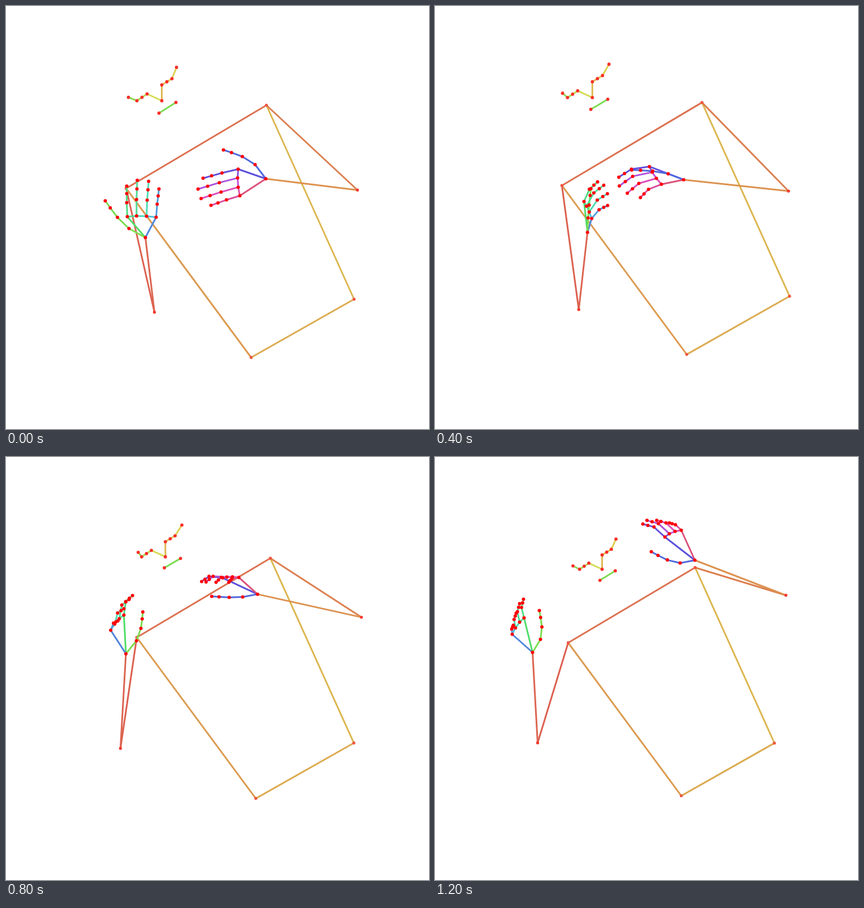
An HTML page with a canvas for the animation above (1.28 s loop, 748 by 748 pixels).

```html
<!DOCTYPE html>
<html lang="en">
<head>
<meta charset="utf-8">
<title>Pose skeleton</title>
<style>
html, body { margin: 0; width: 100%; height: 100%; overflow: hidden; background: #fff; }
canvas { display: block; }
</style>
</head>
<body>
<canvas id="stage" width="748" height="748"></canvas>
<script>
const LOOP = 1280, STEP = 80;
const ctx = document.getElementById('stage').getContext('2d');
const keys = [];
const addKey = (time, pose) => keys.push({ time, ...pose });

// torso: left shoulder and scale; curl: how far the fingers bend
// hands: wrist, then first joint and tip of thumb, index and little finger
addKey(0, {
  torso: [212, 322, 1], nose: [275, 167], elbows: [262, 541, 621, 325], curl: [0.01],
  left: [246, 409, 217, 393, 175, 344, 214, 372, 213, 318, 265, 373, 270, 323],
  right: [459, 305, 440, 280, 384, 254, 410, 288, 348, 304, 413, 335, 362, 352]
});
addKey(160, {
  torso: [215, 318, 1.01], nose: [278, 161], elbows: [267, 538, 619, 333], curl: [0.01],
  left: [274, 404, 249, 385, 217, 333, 255, 365, 265, 314, 303, 372, 317, 326],
  right: [449, 321, 430, 296, 373, 268, 398, 306, 336, 320, 402, 353, 351, 368]
});
addKey(320, {
  torso: [218, 317, 1.014], nose: [277, 159], elbows: [265, 538, 621, 335], curl: [0.03],
  left: [282, 406, 268, 380, 262, 321, 274, 360, 299, 313, 315, 384, 342, 346],
  right: [438, 321, 414, 300, 349, 283, 381, 303, 319, 321, 393, 350, 346, 370]
});
addKey(480, {
  torso: [230, 317, 0.98], nose: [279, 165], elbows: [240, 533, 628, 316], curl: [0.18],
  left: [251, 390, 266, 366, 278, 322, 245, 328, 265, 304, 231, 361, 257, 352],
  right: [442, 289, 412, 289, 350, 291, 379, 261, 334, 279, 409, 275, 382, 300]
});
addKey(640, {
  torso: [235, 317, 0.953], nose: [282, 172], elbows: [218, 520, 629, 299], curl: [0.2],
  left: [217, 365, 234, 342, 239, 295, 208, 302, 219, 273, 185, 331, 198, 319],
  right: [444, 262, 416, 267, 361, 268, 385, 235, 348, 246, 417, 236, 398, 251]
});
addKey(960, {
  torso: [227, 321, 0.95], nose: [282, 181], elbows: [189, 511, 626, 267], curl: [0.15],
  left: [207, 336, 226, 313, 242, 259, 207, 264, 225, 226, 185, 290, 198, 270],
  right: [446, 222, 421, 226, 366, 221, 383, 190, 344, 190, 408, 188, 390, 190]
});
addKey(1200, {
  torso: [235, 328, 0.905], nose: [295, 198], elbows: [181, 505, 620, 244], curl: [0.12],
  left: [172, 345, 186, 322, 184, 271, 157, 284, 156, 251, 136, 313, 138, 297],
  right: [459, 182, 433, 187, 382, 167, 406, 141, 367, 118, 435, 129, 414, 116]
});

const FACE_HUES = [95, 85, 77, 63, 45, 48, 51, 55];
// hues: thumb to little finger, knuckle links, wrist to index, wrist to little finger
const LEFT = { side: -1, fingers: [102, 142, 150, 162, 208], links: [150, 165, 192], index: 130, little: 217 };
const RIGHT = { side: 1, fingers: [230, 248, 280, 314, 326], links: [262, 290, 320], index: 245, little: 342 };

const move = (p, v, k = 1) => [p[0] + v[0] * k, p[1] + v[1] * k];
const span = (p, q) => [q[0] - p[0], q[1] - p[1]];
const mix = (p, q, k) => move(p, span(p, q), k);
const pairs = list => Array.from({ length: list.length / 2 }, (_, i) => list.slice(2 * i, 2 * i + 2));

// Smooth curve through the keys, tangents from the neighbours.
function sample(part, time) {
  let i = keys.findIndex(k => k.time > time) - 1;
  if (i < 0) i = keys.length - 2;
  const a = keys[i], b = keys[i + 1];
  const before = keys[Math.max(i - 1, 0)], after = keys[Math.min(i + 2, keys.length - 1)];
  const gap = b.time - a.time;
  const u = Math.min((time - a.time) / gap, 1), v = 1 - u;
  return a[part].map((p, n) => {
    const q = b[part][n];
    const m0 = (q - before[part][n]) / (b.time - before.time) * gap;
    const m1 = (after[part][n] - p) / (after.time - a.time) * gap;
    return p * v * v * (1 + 2 * u) + m0 * u * v * v + q * u * u * (3 - 2 * u) - m1 * u * u * v;
  });
}

function line(hue, ...points) {
  ctx.strokeStyle = `hsl(${hue}, 67%, 59%)`;
  ctx.beginPath();
  points.forEach(p => ctx.lineTo(...p));
  ctx.stroke();
}

function dots(points, color, radius) {
  ctx.fillStyle = color;
  for (const [x, y] of points) {
    ctx.beginPath();
    ctx.arc(x, y, radius, 0, Math.PI * 2);
    ctx.fill();
  }
}

// The head turns as the nose nears the left shoulder.
function drawFace(nose, [x, , size]) {
  const turn = (63 - nose[0] + x) / 16;
  const at = (dx, dy) => move(nose, [dx, dy], size);
  const eyes = [0, 1, 2];
  const p = [
    at(-59 + 11 * turn, -6 - 3 * turn),
    ...eyes.map(i => at(-44 + 9 * i, -6 * i)),
    nose,
    ...eyes.map(i => at(9 * i, -28 - 5.5 * i)),
    at(26 + 6 * turn, -59)
  ];
  const mouth = [at(-5 + 4 * turn, 22 - 2 * turn), at(25 + 4 * turn, 3)];
  FACE_HUES.forEach((hue, i) => line(hue, p[i], p[i + 1]));
  line(102, ...mouth);
  dots([...p, ...mouth], '#f8302a', 2.9);
}

function drawBody([x, y, size], [elbowL, elbowR], wristL, wristR) {
  const at = (dx, dy) => move([x, y], [dx, dy], size);
  const shoulderL = [x, y], shoulderR = at(248, -147), hipL = at(221, 299), hipR = at(403, 196);
  line(14, shoulderL, shoulderR);
  line(32, shoulderL, hipL);
  line(44, shoulderR, hipR);
  line(39, hipL, hipR);
  line(7, shoulderL, elbowL);
  line(9, elbowL, wristL);
  line(20, shoulderR, elbowR);
  line(28, elbowR, wristR);
  dots([shoulderL, shoulderR, hipL, hipR], '#ee5740', 2.7);
  dots([elbowL, elbowR], '#f23c30', 2.7);
}

// The thumb carries on the bend it has at its first joint.
function thumbJoints(wrist, base, tip) {
  const reach = span(base, tip);
  const bend = move(span(wrist, base), reach, -0.45);
  const joint = (along, k) => move(move(base, reach, along), bend, k);
  return [base, joint(0.43, 0.23), joint(0.76, 0.12), tip];
}

function fingerJoints(base, tip, curl) {
  const [dx, dy] = span(base, tip);
  const along = 0.45 + 0.95 * Math.abs(curl);
  const middle = move(base, [along * dx - curl * dy, along * dy + curl * dx]);
  return [base, middle, mix(middle, tip, 0.55), tip];
}

function drawHand(points, curl, hues) {
  const [wrist, thumb, thumbTip, index, indexTip, little, littleTip] = points;
  const fingers = [0, 1, 2, 3].map(i => {
    const inner = i % 3 > 0, k = i / 3;
    const flat = mix(index, little, k);
    const base = mix(wrist, flat, inner ? 1.04 : 1);
    const reach = span(flat, mix(indexTip, littleTip, k));
    return fingerJoints(base, move(base, reach, inner ? 1.2 : 1), curl * hues.side);
  });
  const chains = [thumbJoints(wrist, thumb, thumbTip), ...fingers];
  line(hues.index, wrist, index);
  line(hues.little, wrist, little);
  hues.links.forEach((hue, i) => line(hue, fingers[i][0], fingers[i + 1][0]));
  line(hues.fingers[0], wrist, thumb);
  chains.forEach((joints, i) => line(hues.fingers[i], ...joints));
  dots([wrist, ...chains.flat()], '#ff0008', 3);
}

function draw() {
  const time = Math.floor(performance.now() % LOOP / STEP) * STEP;
  const torso = sample('torso', time);
  const [curl] = sample('curl', time);
  const [elbows, left, right] = ['elbows', 'left', 'right'].map(part => pairs(sample(part, time)));
  ctx.setTransform(1, 0, 0, 1, 0, 0);
  ctx.fillStyle = '#fff';
  ctx.fillRect(0, 0, 748, 748);
  ctx.translate(0.5, 0.5);
  ctx.lineWidth = 3;
  ctx.lineCap = ctx.lineJoin = 'round';
  drawFace(sample('nose', time), torso);
  drawBody(torso, elbows, left[0], right[0]);
  drawHand(left, curl, LEFT);
  drawHand(right, curl, RIGHT);
  requestAnimationFrame(draw);
}
draw();
</script>
</body>
</html>
```
